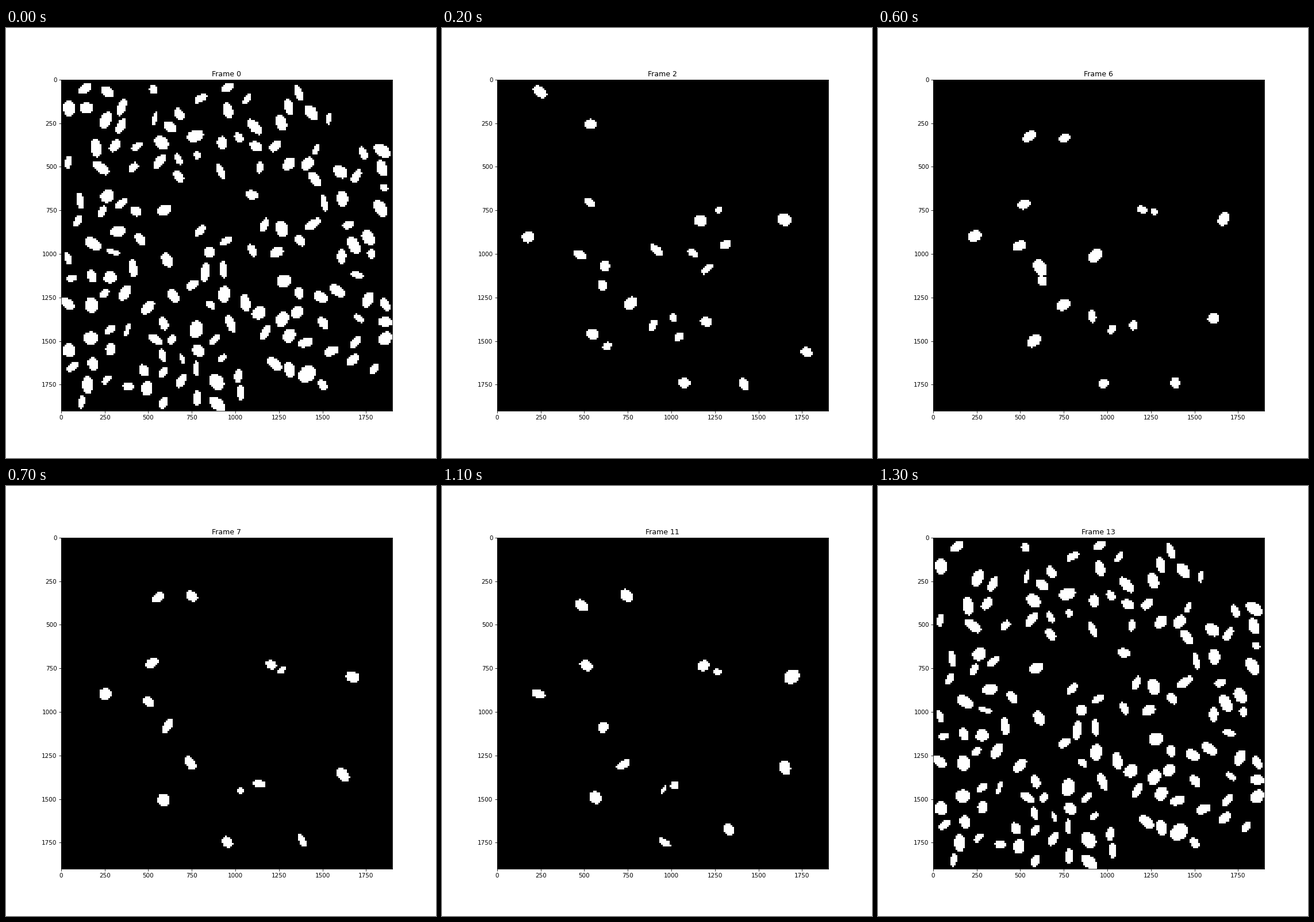
A matplotlib script for the animation above (1.4 s loop, 748x748 px).

```python
import numpy as np
import matplotlib.pyplot as plt
from matplotlib.animation import FuncAnimation

STAGE, GRID, SPAN = 748, 190, 1900
LEFT, TOP, SIDE = 0.128 * STAGE, 0.12 * STAGE, 0.77 * STAGE
FRAMES, RESTING = 14, 153

rng = np.random.default_rng(12)
centres = (np.arange(GRID) + 0.5) * SIDE / GRID
X, Y = np.meshgrid(LEFT + centres, TOP + centres)


def stamp(mask, x, y, w, h, lean):
    """Add an ellipse with a w by h bounding box; lean > 0 tilts like a backslash."""
    u, v = 2 * (X - x) / w, 2 * (Y - y) / h
    mask |= (u * u - 2 * lean * u * v + v * v) / (1 - lean * lean) <= 1.1


def random_shape():
    w, h = rng.normal((19, 21), 4.5).clip(10, 30)
    return w, h, rng.uniform(-0.6, 0.6)


# Cells that leave before the field fills again, and bare patches (x, y, radius)
LEAVING = [(176, 111), (140, 139), (201, 138), (228, 206), (226, 319), (291, 466)]
BARE = [(640, 150, 60), (360, 300, 45), (505, 290, 40), (425, 425, 35),
        (520, 415, 35), (610, 640, 50), (470, 655, 40), (115, 190, 30)]


def scatter(places, count, spacing=28):
    """Throw random cells that keep apart and stay off the bare patches."""
    places = list(places)
    while len(places) < count:
        x, y = rng.uniform((LEFT + 10, TOP + 10), (LEFT + SIDE - 10, TOP + SIDE - 10))
        apart = all(np.hypot(x - a, y - b) > spacing for a, b in places)
        if apart and all(np.hypot(x - a, y - b) > r for a, b, r in BARE):
            places.append((x, y))
    return places


cells = [(*place, *random_shape()) for place in scatter(LEAVING, RESTING)]

tracks = []


def drift(last, *points, first=1, size=19):
    """Move a cell through evenly timed points while its outline wobbles."""
    times = np.linspace(max(first, 2), last, len(points))
    x, y = (np.interp(range(FRAMES), times, axis) for axis in zip(*points))
    w, h = size * rng.normal(1, 0.13, (2, FRAMES)).clip(0.7, 1.3)
    lean = rng.normal(0, 0.3, FRAMES).clip(-0.6, 0.6)
    tracks.append((first, last, np.array([x, y, w, h, lean])))


# Cells followed to the end
drift(12, (258, 167), (264, 194), (238, 211))
drift(12, (325, 192), (321, 190), first=4)
drift(12, (256, 303), (250, 313))
drift(12, (150, 363), (172, 361), (166, 361))
drift(12, (283, 414), (280, 420), size=22)
drift(12, (328, 479), (314, 485), size=21)
drift(12, (261, 532), (274, 546), (265, 540), size=21)
drift(12, (402, 504), (408, 529), (379, 528), size=14)
drift(12, (459, 511), (440, 518), (396, 521), size=17)
drift(12, (449, 335), (461, 311), (453, 313), size=18)
drift(12, (481, 317), (478, 324), size=13)
drift(12, (596, 333), (610, 331), size=23)
drift(12, (578, 511), (599, 487), first=4)
drift(12, (421, 617), (385, 619), (388, 620), size=18)
drift(12, (525, 619), (515, 616), (495, 593), size=18)

# Cells lost on the way
drift(9, (239, 394), (251, 367))
drift(6, (279, 447), (285, 439))
drift(6, (373, 386), (378, 396), size=23)
drift(6, (366, 517), (372, 502), size=18)
drift(4, (170, 111), (165, 118), size=21)
for place in (287, 553), (413, 536), (493, 377), (436, 391), (461, 419), (634, 564):
    drift(2, place, size=17)


def field(n):
    if n == 0:
        visible = cells
    elif n == FRAMES - 1:
        visible = cells[len(LEAVING):]
    else:
        visible = [poses[:, n] for first, last, poses in tracks if first <= n <= last]
    mask = np.zeros((GRID, GRID), bool)
    for cell in visible:
        stamp(mask, *cell)
    return mask


fig = plt.figure(figsize=(10, 10), dpi=STAGE / 10)
ax = fig.add_axes((0.128, 0.11, 0.77, 0.77))
image = ax.imshow(field(0), cmap="gray", vmin=0, vmax=1, interpolation="nearest",
                  extent=(-0.5, SPAN - 0.5, SPAN - 0.5, -0.5))
ticks = range(0, SPAN, 250)
ax.set_xticks(ticks)
ax.set_yticks(ticks)
title = ax.set_title("Frame 0")


def update(n):
    image.set_data(field(n))
    title.set_text(f"Frame {n}")
    return image, title


animation = FuncAnimation(fig, update, frames=FRAMES, interval=100,
                          repeat=True, repeat_delay=0)
plt.show()
```
